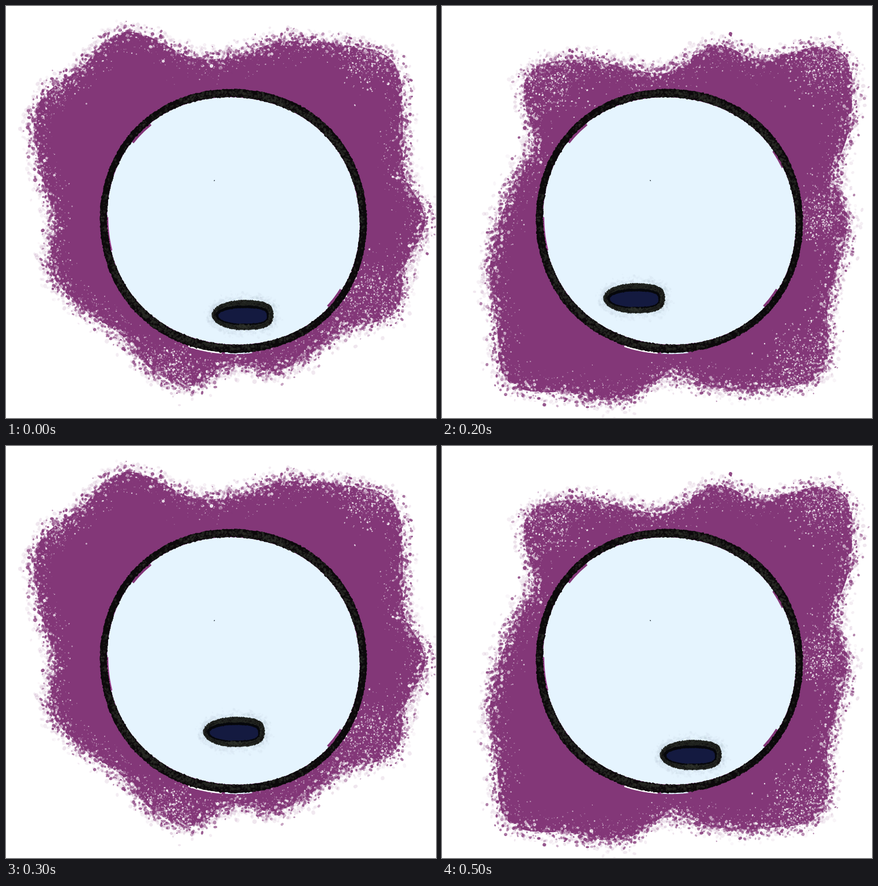
Animation of 745 by 714 pixels, one loop 600 ms. Source, as an HTML page with a canvas:

```html
<!DOCTYPE html>
<html lang="en">
<head>
<meta charset="utf-8">
<title>Talking ball</title>
<style>
html, body { margin: 0; width: 100%; height: 100%; overflow: hidden; background: #fff; }
canvas { display: block; width: 745px; height: 714px; }
</style>
</head>
<body>
<canvas id="stage" width="745" height="714"></canvas>
<script>
const W = 745, H = 714, STEP = 100, TAU = Math.PI * 2, DEG = TAU / 360;
const PURPLE = '#833778', ICE = '#e5f4fe', INK = '#0c090b', OLIVE = '#2b2d27', NAVY = '#141a40';
const CX = 394, CY = 371.5;
const { cos, sin, abs, sign, hypot, floor } = Math;

// reach: cloud radius at equal angles, clockwise from the right
// bare: thinly painted patches as x, y, spread
const scenes = [
  { reach: [332, 307, 320, 267, 267, 271, 248, 297, 293, 278, 303, 328,
            310, 346, 393, 374, 377, 293, 285, 320, 353, 390, 338, 307],
    bare: [[630, 85, 26], [82, 125, 22], [625, 500, 32], [290, 630, 26]] },
  { reach: [298, 311, 325, 333, 260, 272, 286, 305, 317, 325, 357, 314,
            304, 298, 288, 343, 308, 337, 324, 309, 326, 361, 325, 295],
    bare: [[180, 152, 24], [340, 72, 30], [640, 430, 36], [610, 170, 36]] },
  { reach: [308, 303, 316, 373, 336, 299, 268, 322, 345, 395, 345, 322,
            293, 276, 270, 350, 322, 272, 257, 313, 322, 415, 364, 296],
    bare: [[190, 125, 30], [665, 100, 34], [655, 362, 28], [625, 620, 34]] }
];
const mouthShift = [[0, 0], [-45, -4], [-77, -29], [-15, -40], [53, -27], [21, 0]];

function randomFrom(seed) {
  return () => {
    seed = (seed + 0x6D2B79F5) | 0;
    let t = Math.imul(seed ^ (seed >>> 15), 1 | seed);
    t = (t + Math.imul(t ^ (t >>> 7), 61 | t)) ^ t;
    return ((t ^ (t >>> 14)) >>> 0) / 4294967296;
  };
}
let rnd = randomFrom(1);
const range = (a, b) => a + (b - a) * rnd();
const gauss = () => Math.sqrt(-2 * Math.log(1 - rnd())) * cos(TAU * rnd());

function layer() {
  const c = document.createElement('canvas');
  c.width = W;
  c.height = H;
  return c;
}

// Smooth periodic interpolation, u in turns
function spline(values, u) {
  const n = values.length, i = floor(u * n), t = u * n - i;
  const [a, b, c, d] = [-1, 0, 1, 2].map(k => values[(i + k + n) % n]);
  return b + t / 2 * (c - a + t * (2 * a - 5 * b + 4 * c - d + t * (3 * (b - c) + d - a)));
}

// Outlines take an angle and give a point
const cloud = reach => a => {
  const r = spline(reach, a / TAU);
  return [CX + r * cos(a), CY + r * sin(a)];
};

// Hand-drawn ring: bulges towards its diagonals, heavier at upper right and lower left
const weight = a => cos(2 * a + 120 * DEG);
const rim = inset => a => {
  const bulge = 1.008 - .007 * cos(4 * a) + .005 * sin(2 * a) + .004 * sin(a);
  const r = inset * (13.5 + 2 * weight(a));
  return [CX + (231 * bulge - r) * cos(a), CY + (228.5 * bulge - r) * sin(a)];
};

// Oval with a squarer right end
const oval = (x, y, rx, ry) => a => {
  const p = cos(a) > 0 ? .7 : 1;
  const bend = v => sign(v) * abs(v) ** p;
  return [x + rx * bend(cos(a)), y + ry * bend(sin(a))];
};

function sample(outline, count, from = 0, to = 360) {
  return Array.from({ length: count }, (_, i) => outline((from + (to - from) * i / count) * DEG));
}

function trace(path, pts, rough = 0) {
  pts.forEach(([x, y], i) => {
    const px = x + gauss() * rough, py = y + gauss() * rough;
    if (i) path.lineTo(px, py); else path.moveTo(px, py);
  });
  return path;
}

function shape(pts, rough) {
  const path = trace(new Path2D(), pts, rough);
  path.closePath();
  return path;
}

function fill(g, path, color) {
  g.fillStyle = color;
  g.fill(path, 'evenodd');
}

function sliver(g, outline, from, to, width, color) {
  g.strokeStyle = color;
  g.lineWidth = width;
  g.stroke(trace(new Path2D(), sample(outline, 30, from, to)));
}

function dot(g, x, y, r, color, alpha) {
  g.globalAlpha = alpha;
  g.fillStyle = color;
  g.beginPath();
  g.ellipse(x, y, r, r * range(.6, 1), range(0, TAU), 0, TAU);
  g.fill();
  g.globalAlpha = 1;
}

// Scatters dots about an edge; mean and spread are outward distances
function spray(g, pts, mean, spread, size, alpha, color) {
  pts.forEach(([x, y], i) => {
    const [nx, ny] = pts[(i + 1) % pts.length];
    const len = hypot(nx - x, ny - y) || 1, d = mean + gauss() * spread;
    dot(g, x + (ny - y) / len * d, y - (nx - x) / len * d, range(...size), color, range(...alpha));
  });
}

function paintCloud(g, { reach, bare }, seed) {
  rnd = randomFrom(seed);
  const edge = sample(cloud(reach), 1500);
  g.filter = 'blur(.7px)';
  const soft = layer(), s = soft.getContext('2d');
  fill(s, shape(edge), PURPLE);
  spray(s, edge, 0, 7, [1, 3.5], [.4, .9], '#fff');
  spray(s, edge, -16, 12, [.4, 1.4], [.2, .7], '#fff');
  for (const [x, y, spread] of bare)
    for (let i = 0; i < spread * 17; i++)
      dot(s, x + gauss() * spread, y + gauss() * spread, range(.5, 1.8), '#fff', range(.2, .9));
  spray(s, edge, 8, 8, [2, 4], [.04, .14], PURPLE);
  spray(s, edge, -1, 8, [1.5, 3.5], [.4, .9], PURPLE);
  spray(s, edge, -1, 9, [1, 3], [.2, .7], PURPLE);
  g.drawImage(soft, 0, 0);
  g.filter = 'none';
}

function paintBall(g, showsRightSliver) {
  rnd = randomFrom(71);
  const outer = rim(0), inner = rim(1);
  sliver(g, outer, 95, 110, 5, '#fff');
  sliver(g, outer, 82, 94, 4, ICE);
  fill(g, shape(sample(inner, 700)), ICE);
  sliver(g, inner, 166, 182, 4, '#9b3c8c');
  sliver(g, inner, 218, 230, 8, PURPLE);
  sliver(g, inner, 33, 43, 8, PURPLE);
  if (showsRightSliver) sliver(g, inner, -34, -25, 5, PURPLE);

  const ring = shape(sample(outer, 700), .5);
  ring.addPath(shape(sample(inner, 700), .5));
  fill(g, ring, INK);
  g.save();
  g.clip(ring, 'evenodd');
  // Charcoal grain, strongest where the ring is heaviest
  for (let i = 0; i < 3500; i++) {
    const a = range(0, TAU);
    if (rnd() > .4 + .35 * weight(a)) continue;
    const [x, y] = rim(.6 + gauss() * .28)(a);
    dot(g, x, y, range(1, 2.6), OLIVE, range(.3, .8));
  }
  g.restore();
  dot(g, 361, 302.5, 1.1, '#26303a', .9);
}

function paintMouth(g) {
  rnd = randomFrom(93);
  const edge = sample(oval(410, 535.5, 53.5, 26), 300);
  for (let pass = 0; pass < 3; pass++) spray(g, edge, 2, 5, [1, 3], [.03, .06], '#8b94a5');
  const lip = shape(edge, .5);
  fill(g, lip, '#20231f');
  g.save();
  g.clip(lip);
  spray(g, edge, -4, 3, [.6, 2], [.2, .5], '#30342d');
  spray(g, edge, -4, 3, [.6, 2], [.2, .5], INK);
  g.restore();
  fill(g, shape(sample(oval(409, 536, 46, 17), 200), .4), '#06070b');
  fill(g, shape(sample(oval(410, 537, 42, 13.5), 200), .3), NAVY);
  for (let i = 0; i < 30; i++)
    dot(g, 413 + gauss() * 8, 554 + gauss() * 1.6, range(1, 2.4), '#30332d', .6);
}

const backdrops = scenes.map((scene, i) => {
  const c = layer(), g = c.getContext('2d');
  g.fillStyle = '#fff';
  g.fillRect(0, 0, W, H);
  paintCloud(g, scene, 11 + i);
  paintBall(g, i > 0);
  return c;
});
const mouth = layer();
paintMouth(mouth.getContext('2d'));

const view = document.getElementById('stage').getContext('2d');

function draw(time) {
  const pose = floor(time / STEP) % mouthShift.length;
  view.drawImage(backdrops[pose % backdrops.length], 0, 0);
  view.drawImage(mouth, ...mouthShift[pose]);
}

function tick() {
  draw(performance.now());
  requestAnimationFrame(tick);
}
tick();
</script>
</body>
</html>
```
